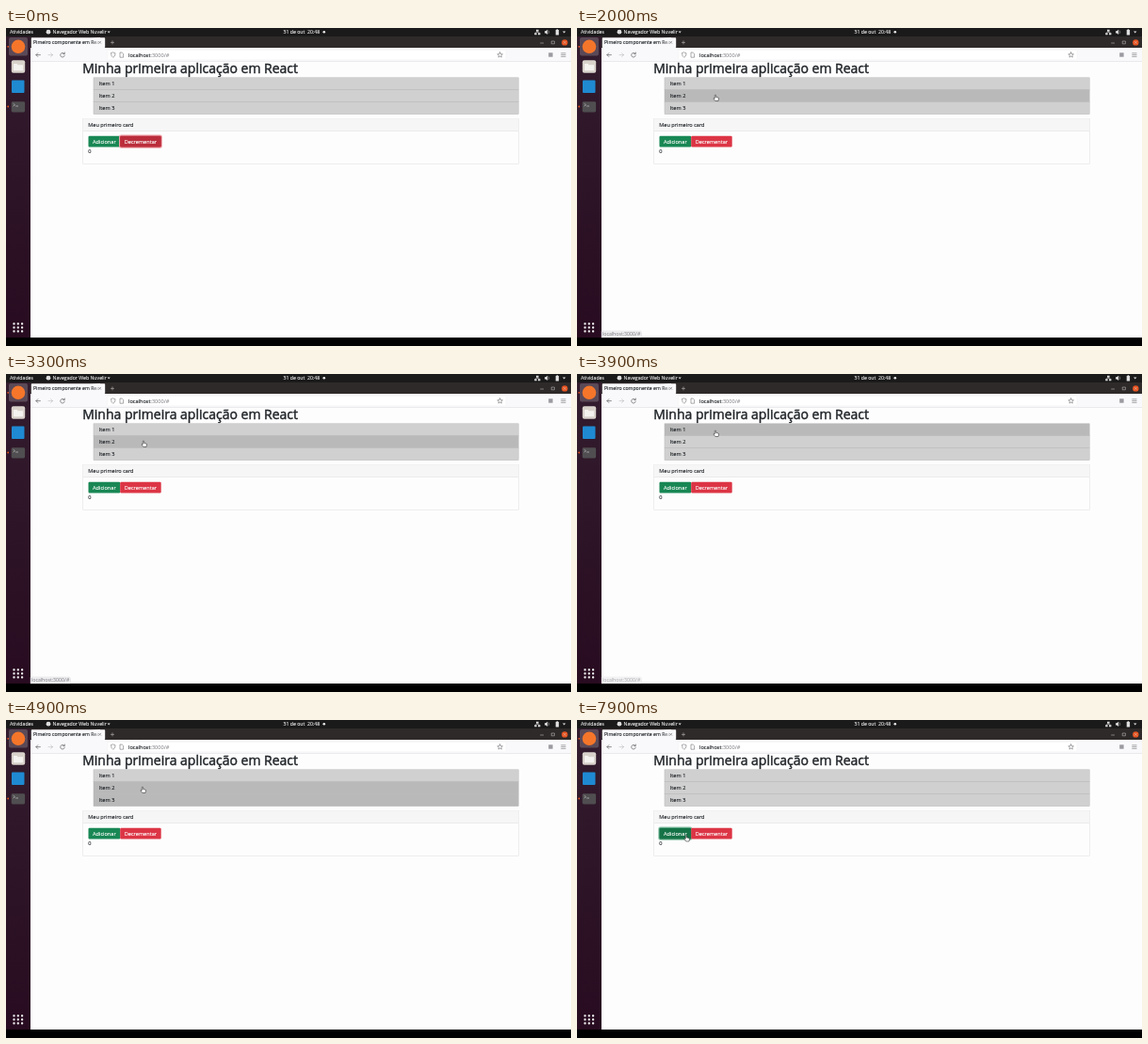
Recreate the animation shown at these times as an HTML page. Size 600 by 338 pixels, loop 8000 ms.

```html
<!DOCTYPE html>
<html lang="pt-BR">
<head>
<meta charset="utf-8">
<title>Minha primeira aplicação em React</title>
<style>
html, body { margin: 0; width: 100%; height: 100%; overflow: hidden; background: #000; }
svg { display: block; width: 100vw; height: 100vh; }
text { font-family: "Open Sans", "Noto Sans", sans-serif; font-size: 5.6px; fill: #212529; stroke: #212529; stroke-width: .13; white-space: pre; }
.title { font-size: 14px; stroke-width: .45; }
.bar { font-size: 5.2px; fill: #e4e4e4; stroke: #e4e4e4; }
.small { font-size: 5.2px; }
.grey { fill: #85858b; stroke: #85858b; stroke-width: .05; }
.white { fill: #fff; stroke: #fff; }
.line { fill: none; stroke: #55555b; stroke-width: .65; stroke-linecap: round; stroke-linejoin: round; }
.thin { stroke-width: .5; }
.light { stroke: #ccc; }
</style>
</head>
<body>
<svg viewBox="0 0 600 338">
  <defs>
    <linearGradient id="dockFill" x2="0" y2="1">
      <stop offset="0" stop-color="#331d2e"/><stop offset="1" stop-color="#280b20"/>
    </linearGradient>
    <linearGradient id="tabFade">
      <stop offset="0" stop-color="#f9f9fb" stop-opacity="0"/><stop offset="1" stop-color="#f9f9fb"/>
    </linearGradient>
  </defs>

  <!-- system bar -->
  <rect width="600" height="338" fill="#000"/>
  <rect width="600" height="9" fill="#1b1a1b"/>
  <text class="bar" x="4" y="6.2">Atividades</text>
  <circle cx="45" cy="4.2" r="2.4" fill="#ddd"/>
  <text class="bar" x="49.5" y="6.2">Navegador Web Nuvelir</text>
  <path d="M107.6 3.4h3.2l-1.6 2z" fill="#ddd"/>
  <text class="bar" x="294.5" y="6.2">31 de out  20:48</text>
  <circle cx="337.8" cy="4.3" r="1.3" fill="#eee"/>
  <g fill="#ddd">
    <path d="M563 1.8h2.6v2H563zM561.2 5.2h2.4v2h-2.4zM565 5.2h2.4v2H565z"/>
    <path d="M572 3.3h1.3l1.8-1.6v5.4l-1.8-1.6H572z"/>
    <path d="M584.6 1.3h1.6v.8h.9v5.3h-3.4V2.1h.9z"/>
    <path d="M591 3.4h3.4l-1.7 2z"/>
  </g>
  <path class="line thin light" d="M564.3 3.8v.8M562.4 5.2v-.6h3.8v.6M576.2 2.8q1.2 1.5 0 3"/>

  <!-- dock -->
  <rect y="9" width="26" height="320" fill="url(#dockFill)"/>
  <rect x="3" y="10" width="20" height="19.5" rx="2" fill="#fff" opacity=".2"/>
  <circle cx="13" cy="19.8" r="7.3" fill="#f5762a"/>
  <g fill="#e95420"><circle cx="2.2" cy="19.8" r=".9"/><circle cx="2.2" cy="83.5" r=".9"/></g>
  <rect x="5.8" y="34.3" width="14.4" height="13.4" rx="2" fill="#d8d2cb"/>
  <path d="M8 38h3.6l1 1.2H18v6H8z" fill="#f4f2ef"/>
  <rect x="6" y="55.5" width="13.5" height="13.5" rx="1" fill="#1f8ad2"/>
  <rect x="5.7" y="78.2" width="14.4" height="11.2" rx="1.4" fill="#504e50"/>
  <path class="line light" d="M8 80.5l1.4 1.2L8 82.900M10.600 83h2"/>
  <g id="grid" fill="#f2f2f2"></g>

  <!-- browser window -->
  <rect x="26" y="9" width="574" height="12.5" fill="#2f2a2a"/>
  <rect x="26.8" y="10.3" width="78.4" height="10.7" rx=".8" fill="#f9f9fb"/>
  <svg x="28" y="10" width="72" height="11">
    <text class="small" x="1" y="7.4">Pimeiro componente em React</text>
    <rect x="62" width="10" height="10" fill="url(#tabFade)"/>
  </svg>
  <path class="line thin" d="M98.6 14.2l2.2 2.2m0-2.2l-2.2 2.2"/>
  <path class="line thin light" d="M111.4 15.4h3.2m-1.6-1.6V17M567.6 16h3M579.6 14h2.800v2.800h-2.800z"/>
  <circle cx="593.3" cy="15.4" r="3.2" fill="#e95420"/>
  <path class="line thin light" d="M592.2 14.3l2.2 2.2m0-2.2l-2.2 2.2"/>
  <rect x="26" y="21" width="574" height="15" fill="#f9f9fb"/>
  <rect x="108" y="23.3" width="423" height="10.5" rx="1.2" fill="#fff" stroke="#f0f0f3" stroke-width=".5"/>
  <path class="line" d="M36.4 28.6H32m1.8-1.900l-1.900 1.900 1.900 1.900"/>
  <path class="line" d="M45 28.6h4.4m-1.8-1.900l1.900 1.900-1.900 1.900" opacity=".35"/>
  <path class="line" d="M61.800 27.2a2.3 2.3 0 1 0 .5 2M62.3 26v1.6h-1.6"/>
  <path class="line thin" d="M113.8 26l2.3.8q0 3.5-2.3 4.6-2.3-1.1-2.3-4.6zM121.4 26h1.8l1.4 1.4v3.8h-3.2z"/>
  <text x="130" y="30.6">localhost<tspan class="grey">:3000/#</tspan></text>
  <path class="line thin" d="M524.6 25.8l.8 1.8 2 .2-1.5 1.3.4 2-1.7-1-1.7 1 .4-2-1.5-1.3 2-.2z"/>
  <rect x="576.2" y="26.3" width="4.4" height="4.4" fill="#9a9aa0"/>
  <path class="line thin" d="M589.7 26.8h4.4m-4.4 1.8h4.4m-4.4 1.8h4.4"/>
  <rect x="26" y="35.4" width="574" height=".6" fill="#e2e2e5"/>

  <!-- page -->
  <rect x="26" y="36" width="574" height="293" fill="#fdfdfd"/>
  <text class="title" x="81.2" y="47.8">Minha primeira aplicação em React</text>
  <g id="list"></g>
  <rect x="81.700" y="96.3" width="462.700" height="48" fill="#fdfdfd" stroke="#e4e4e4" stroke-width=".6"/>
  <rect x="82" y="96.6" width="462.1" height="12.6" fill="#f6f6f6"/>
  <rect x="82" y="109" width="462.1" height=".6" fill="#e2e2e2"/>
  <text x="87.2" y="104.9">Meu primeiro card</text>
  <g id="buttons"></g>
  <text id="count" x="87.2" y="132.7">0</text>
  <g id="status">
    <path d="M26 322h40.500q2 0 2 2v5H26z" fill="#f0f0f2" stroke="#d4d4d8" stroke-width=".4"/>
    <text class="small grey" x="27" y="327.3">localhost:3000/#</text>
  </g>
  <g id="cursor" stroke="#222" stroke-width=".55" stroke-linejoin="round" fill="#fff">
    <path id="hand" d="M-.7.4q.7-.9 1.300 0V2.500l2.300.5q.8.2.7 1.200L3 6.500H-.1L-2 4.100q-.1-1 1.300-.3z"/>
    <path id="arrow" d="M0 0v5.600l1.300-1.200.9 2 .9-.4-.9-1.900h1.800z" fill="#111" stroke="#fff"/>
  </g>
</svg>
<script>
const LOOP = 8000, STEP = 100;
const $ = id => document.getElementById(id);

function add(parent, tag, attrs, label) {
  const el = document.createElementNS("http://www.w3.org/2000/svg", tag);
  for (const key in attrs) el.setAttribute(key, attrs[key]);
  if (label) el.textContent = label;
  parent.append(el);
  return el;
}

for (let i = 0; i < 9; i++)
  add($("grid"), "rect", { x: 7.4 + i % 3 * 4.3, y: 313.2 + Math.floor(i / 3) * 4, width: 2.2, height: 2.2, rx: .7 });

const TOP = 52.8, ROW = 12.95;
const items = [0, 1, 2].map(i => {
  const y = TOP + i * ROW;
  const box = add($("list"), "rect", { x: 93, y, width: 451.2, height: ROW, stroke: "#b8b8b8", "stroke-width": .5 });
  add($("list"), "text", { x: 98.8, y: y + 8.3 }, "Item " + (i + 1));
  return box;
});

function makeButton(x, width, label, base, hot, halo) {
  const group = $("buttons"), y = 114.8, height = 11.8;
  const ring = add(group, "rect", { x: x - .6, y: y - .6, width: width + 1.2, height: height + 1.2, rx: 1.6,
    fill: "none", stroke: halo, "stroke-width": 1.2 });
  const box = { x, y, width, height, rx: 1.1 };
  add(group, "rect", { ...box, fill: base });
  const shade = add(group, "rect", { ...box, fill: hot });
  add(group, "text", { x: x + 4.5, y: y + 7.700, class: "white" }, label);
  return { ring, shade };
}
const plus = makeButton(87.5, 33.7, "Adicionar", "#198754", "#157347", "#8cc2a8");
const minus = makeButton(121.2, 43.5, "Decrementar", "#dc3545", "#bb2d3b", "#eda0a8");

// time, x, y of the pointer tip
const path = [
  [300, 20, 56], [900, 145, 66], [1200, 152, 80], [1400, 153, 82], [1700, 150, 79],
  [2000, 147, 71], [2200, 146, 69], [2400, 146, 60], [2600, 146, 70], [2800, 146, 85],
  [3100, 146, 83], [3300, 146, 71], [3700, 147, 59], [3900, 147, 60], [4200, 146, 70],
  [4500, 145, 84], [4700, 145, 81], [4900, 145, 71], [5100, 145, 72], [5400, 143, 90],
  [5700, 140, 112], [5900, 140, 122], [7000, 140, 122], [7300, 116, 122.5], [8000, 116, 122.5]
];
const focusTimes = [[0, "minus"], [600, ""], [2100, 1], [3700, 0], [4500, 2], [5900, "minus"], [7300, "plus"]];
const countTimes = [[0, 0], [6200, -1], [6400, -2], [6700, -3], [7300, -2], [7500, -1], [7800, 0]];
const statusTimes = [[0, 0], [1500, 1], [3900, .65], [4100, 0], [5100, 1], [5500, 0]];

const held = (table, t) => table.filter(row => row[0] <= t).pop()[1];

function pointer(t) {
  const i = path.findIndex(p => p[0] > t);
  if (i < 1) return path[0].slice(1);
  const [a, b] = [path[i - 1], path[i]];
  const k = (t - a[0]) / (b[0] - a[0]);
  return [1, 2].map(n => a[n] + (b[n] - a[n]) * k);
}

function paint(button, over, focused) {
  button.shade.setAttribute("opacity", +(over || focused));
  button.ring.setAttribute("opacity", +focused);
}

function draw(t) {
  const [x, y] = pointer(t);
  const focus = held(focusTimes, t);
  const row = x > 93 && y >= TOP && y < TOP + 3 * ROW ? Math.floor((y - TOP) / ROW) : -1;
  const onButton = y > 114.8 && y < 126.6 && x > 87.5 && x < 164.7;

  items.forEach((box, i) => box.setAttribute("fill", i === row || i === focus ? "#b9b9b9" : "#d0d0d0"));
  paint(plus, onButton && x < 121.2, focus === "plus");
  paint(minus, onButton && x >= 121.2, focus === "minus");
  $("count").textContent = held(countTimes, t);
  $("status").setAttribute("opacity", held(statusTimes, t));

  const link = row >= 0 || onButton;
  $("cursor").setAttribute("transform", `translate(${x} ${y})`);
  $("cursor").setAttribute("visibility", t < 300 ? "hidden" : "inherit");
  $("hand").setAttribute("display", link ? "inline" : "none");
  $("arrow").setAttribute("display", link ? "none" : "inline");
}

const start = performance.now();
function tick(now) {
  const t = Math.max(0, now - start) % LOOP;
  draw(Math.floor(t / STEP) * STEP);
  requestAnimationFrame(tick);
}
draw(0);
requestAnimationFrame(tick);
</script>
</body>
</html>
```
